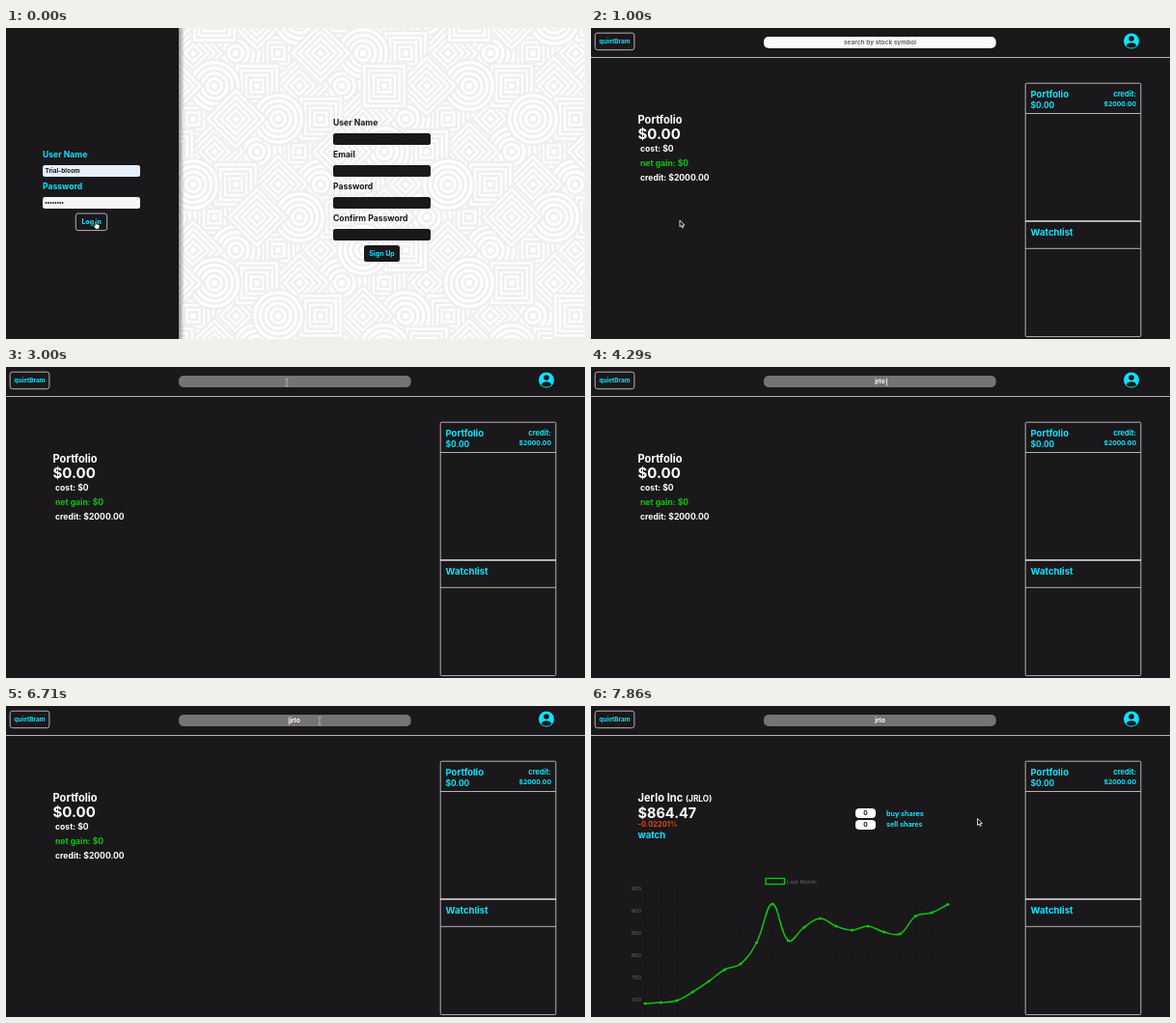
Write an HTML page that moves like this. It is 600 px wide and 322 px high and loops after 8 s.

```html
<!DOCTYPE html>
<html lang="en">
<head>
<meta charset="utf-8">
<title>Stock portfolio demo</title>
<style>
  html, body { margin: 0; width: 100%; height: 100%; overflow: hidden; background: #1a181b; }
  svg { display: block; width: 100%; height: 100%; }
  text { font-family: Inter, sans-serif; font-weight: 650; fill: #fff; }
  .cyan { fill: #0be4fc; }
  .dark { fill: #1a181b; }
  .mid { text-anchor: middle; }
  .end { text-anchor: end; }
  .line { fill: none; stroke: #b4b3b5; }
  .axis { font: 6.2px "Liberation Sans", Arial, sans-serif; fill: #666; }
</style>
</head>
<body>
<svg viewBox="0 0 600 322">
  <defs>
    <g id="tile0"></g><g id="tile1"></g><g id="tile2"></g>
    <linearGradient id="shade">
      <stop stop-color="#000" stop-opacity=".38"/>
      <stop offset="1" stop-color="#000" stop-opacity="0"/>
    </linearGradient>
  </defs>

  <g id="login">
    <rect width="600" height="322" fill="#fff"/>
    <g id="backdrop"></g>
    <rect x="179" width="6" height="322" fill="url(#shade)"/>
    <rect class="dark" width="179" height="322"/>
    <g font-size="8.6">
      <text class="cyan" x="38" y="134">User Name</text>
      <text class="cyan" x="38" y="167">Password</text>
    </g>
    <rect x="38" y="142" width="101" height="12" rx="2.5" fill="#e8f0fe"/>
    <rect x="38" y="175" width="101" height="12" rx="2.5" fill="#f4f8f3"/>
    <text class="dark" x="40.5" y="150.4" font-size="6.4">Trial-bloom</text>
    <g id="dots" class="dark"></g>
    <rect class="line" x="72.3" y="192" width="32.4" height="17.6" rx="2.5"/>
    <rect id="ring" x="72" y="191.5" width="33" height="18.5" rx="2.5" fill="none" stroke="#58b4e4" stroke-width="1.7"/>
    <text class="cyan mid" x="88.7" y="203.3" font-size="7">Log in</text>
    <g id="signup"></g>
    <rect class="dark" x="371" y="225" width="37" height="17" rx="2.5"/>
    <text class="cyan mid" x="389.5" y="236.2" font-size="7">Sign Up</text>
  </g>

  <g id="app">
    <rect class="dark" width="600" height="322"/>
    <rect class="line" x="4.2" y="5.2" width="40.7" height="17.5" rx="2.5"/>
    <text class="cyan mid" x="24.5" y="16.3" font-size="6.4">quietBram</text>
    <rect id="bar" x="179" y="9.1" width="240.7" height="11.9" rx="5"/>
    <text id="hint" class="mid" x="299.5" y="17.4" font-size="6.5" style="fill:#68666a">search by stock symbol</text>
    <text id="query" class="mid" x="299.5" y="17.4" font-size="6.8"></text>
    <path id="spelling" d="M293.5 19.3h12.5" stroke="#e0453c" stroke-width=".7" stroke-dasharray="1 .7"/>
    <rect id="caret" y="11.5" width=".8" height="8" fill="#fff"/>
    <circle cx="560" cy="13.5" r="8" fill="#0be4fc"/>
    <circle class="dark" cx="560" cy="11" r="2.8"/>
    <path class="dark" d="M554.6 18.4q1.4-3.2 5.4-3.2t5.4 3.2q-2 2.2-5.4 2.2t-5.4-2.2z"/>
    <path class="line" d="M0 30.5H600"/>

    <g class="line">
      <rect x="450.2" y="57.2" width="119.6" height="262.4" rx="1"/>
      <path d="M450 88.5h120M450 228.3h120"/>
      <path d="M450 200h120" stroke="#e4e4e4" stroke-width="1.4"/>
    </g>
    <text class="cyan" x="455.5" y="72" font-size="9.5">Portfolio</text>
    <text class="cyan" x="455.5" y="83.3" font-size="8.4">$0.00</text>
    <text class="cyan end" x="565" y="71.2" font-size="7.5">credit:</text>
    <text class="cyan end" x="565" y="81.2" font-size="6.8">$2000.00</text>
    <text class="cyan" x="455.5" y="215" font-size="9.6">Watchlist</text>

    <g id="summary">
      <text x="48.5" y="99" font-size="11.1">Portfolio</text>
      <text x="48.5" y="115" font-size="15">$0.00</text>
      <g font-size="8.6">
        <text x="51" y="127.8">cost: $0</text>
        <text x="51" y="143" style="fill:#0cc40c">net gain: $0</text>
        <text x="51" y="158.2">credit: $2000.00</text>
      </g>
    </g>

    <g id="stock">
      <text x="48.5" y="99" font-size="11.1">Jerlo Inc <tspan font-size="8.3">(JRLO)</tspan></text>
      <text x="48.5" y="115.8" font-size="14.5">$864.47</text>
      <text x="48.5" y="125" font-size="7.5" style="fill:#e5440f">-0.02201%</text>
      <text class="cyan" x="48.5" y="136.5" font-size="9.6">watch</text>
      <rect x="274" y="106" width="21" height="10" rx="4" fill="#fff"/>
      <rect x="274" y="118" width="21" height="10" rx="4" fill="#fff"/>
      <g font-size="6.6">
        <text class="dark mid" x="284.5" y="113.4">0</text>
        <text class="dark mid" x="284.5" y="125.4">0</text>
      </g>
      <text class="cyan" x="306" y="113.5" font-size="7.2">buy shares</text>
      <text class="cyan" x="306" y="125.4" font-size="7.2">sell shares</text>
      <rect x="181" y="178.5" width="19.5" height="6" fill="none" stroke="#0cc40c" stroke-width="1.4"/>
      <text class="axis" x="203" y="183.8">Last Month</text>
      <g id="axis"></g>
      <path id="curve" fill="none" stroke="#0cc40c" stroke-width="1.5"/>
      <path id="marks" stroke="#0cc40c" stroke-width="3.2" stroke-linecap="round"/>
    </g>
  </g>

  <g id="pointer" stroke-linejoin="round">
    <path id="hand" d="M-.8 4.2L-2.6 1.6Q-2.6.6-1.6 1L-.8 1.8V-2.6Q0-3.6.8-2.6V0L3.2.6Q4.2 1 4 2.2L3.2 5.2H0z" fill="#fff" stroke="#111" stroke-width=".7"/>
    <path id="arrow" d="M0 0V7L1.6 5.5 2.7 8 3.8 7.5 2.8 5.1H5z" fill="#111" stroke="#fff" stroke-width=".8"/>
    <path id="beam" d="M-1.8-4Q0-4 0-3V3Q0 4-1.8 4M1.8-4Q0-4 0-3M0 3Q0 4 1.8 4" fill="none" stroke="#c8c8c8" stroke-width=".7"/>
  </g>
</svg>

<script>
const LOOP = 8000, FPS = 7;
const $ = id => document.getElementById(id);
const show = (id, on) => $(id).style.display = on ? '' : 'none';
const clamp = v => Math.min(1, Math.max(0, v));
const ramp = (t, from, to) => clamp((t - from) / (to - from));
const mix = (a, b, k) => a + (b - a) * k;
const range = (n, make) => Array.from({ length: n }, (_, i) => make(i)).join('');

// Wallpaper: concentric circles, squares and diamonds, stacked in scattered order.
const shapes = [
  r => `<circle r="${r}"/>`,
  r => `<rect x="${-r * .85}" y="${-r * .85}" width="${r * 1.7}" height="${r * 1.7}"/>`,
  r => `<path d="M0 ${-r * 1.2}L${r * 1.2} 0 0 ${r * 1.2} ${-r * 1.2} 0z"/>`
];
const COLS = 11, ROWS = 11;
shapes.forEach((shape, i) => $('tile' + i).innerHTML = range(5, n => shape(27 - n * 5.6)));
$('backdrop').innerHTML = `<g fill="#fff" stroke="#f0eef1" stroke-width="2.6">` +
  range(COLS * ROWS, i => {
    const cell = i * 47 % (COLS * ROWS), col = cell % COLS, row = Math.floor(cell / COLS);
    return `<use href="#tile${(col + row * 2 + (row >> 1)) % 3}" x="${172 + col * 44 + row % 2 * 22}" y="${row * 34 - 8}"/>`;
  }) + '</g>';

$('dots').innerHTML = range(8, i => `<circle cx="${41.5 + i * 2.45}" cy="181" r=".9"/>`);
$('signup').innerHTML = ['User Name', 'Email', 'Password', 'Confirm Password'].map((label, i) =>
  `<text class="dark" font-size="8.6" x="339" y="${101 + i * 33}">${label}</text>
   <rect class="dark" x="339" y="${109 + i * 33}" width="101" height="12" rx="2.5"/>`).join('');

// Price chart
const heights = [308, 307, 305, 296, 285, 273, 267, 245, 205, 243, 229, 220, 228, 232, 228, 234, 236, 217.5, 214, 205.5];
const BASE = 327, STEP = 16.5, LEFT = 56;
$('axis').innerHTML =
  range(20, i => `<path d="M${LEFT + i * STEP} 189V322" stroke="#000" stroke-opacity=".12"/>`) +
  range(6, i => `<path d="M52 ${189 + i * 23}H370" stroke="#000" stroke-opacity=".12"/>
    <text class="axis end" x="52" y="${191.2 + i * 23}">${950 - i * 50}</text>`);

function drawChart(grow) {
  const pts = heights.map((h, i) => [LEFT + i * STEP, mix(BASE, h, grow)]);
  const dist = (a, b) => Math.hypot(a[0] - b[0], a[1] - b[1]);
  const controls = pts.map((p, i) => {
    const prev = pts[i - 1] || p, next = pts[i + 1] || p;
    const before = dist(prev, p), after = dist(p, next);
    const offset = length => {
      const k = .4 * length / (before + after);
      return [k * (next[0] - prev[0]), k * (next[1] - prev[1])];
    };
    const a = offset(before), b = offset(after);
    return { enter: [p[0] - a[0], p[1] - a[1]], leave: [p[0] + b[0], p[1] + b[1]] };
  });
  $('curve').setAttribute('d', pts.map((p, i) =>
    i ? `C${controls[i - 1].leave} ${controls[i].enter} ${p}` : `M${p}`).join(''));
  $('marks').setAttribute('d', pts.map(p => `M${p}h.01`).join(''));
}

// Pointer path: time, x, y
const path = [
  [0, 93, 203], [990, 93, 203], [1000, 92, 199], [1710, 284, 51], [2000, 284, 51], [2570, 291, 16],
  [4720, 291, 16], [5570, 297, 15.5], [6430, 297, 15.5], [6710, 325, 15.5],
  [7570, 325, 15.5], [7850, 400.5, 116.5], [LOOP, 400.5, 116.5]
];
function pointerAt(t) {
  const i = path.findIndex(key => key[0] > t);
  const [t0, x0, y0] = path[i - 1], [t1, x1, y1] = path[i];
  const k = ramp(t, t0, t1), ease = k * k * (3 - 2 * k);
  return [mix(x0, x1, ease), mix(y0, y1, ease)];
}

const keyTimes = [3400, 3550, 4130, 4270];
const between = (t, a, b) => t >= a && t < b;

function render(t) {
  const loggedIn = t >= 1000, loaded = t >= 6990;
  show('login', !loggedIn);
  show('app', loggedIn);
  $('ring').style.opacity = ramp(t, 0, 430);

  const focus = ramp(t, 2000, 2430);
  const grey = [250, 250, 252].map((c, i) => Math.round(mix(c, [117, 115, 118][i], focus)));
  $('bar').setAttribute('fill', `rgb(${grey})`);
  $('hint').style.opacity = 1 - focus;
  const typed = keyTimes.filter(k => t >= k).length;
  $('query').textContent = 'jrlo'.slice(0, typed);
  show('spelling', between(t, 4850, 6990));
  show('caret', between(t, 2560, 2990) || between(t, 3130, 4850) || between(t, 6130, 6990));
  $('caret').setAttribute('x', t > 5000 ? 292.8 : 299.2 + typed * 1.7);

  show('summary', !loaded);
  show('stock', loaded);
  drawChart(1 - (1 - ramp(t, 6900, 7900)) ** 4);

  const [x, y] = pointerAt(t);
  const overBar = loggedIn && y < 21;
  $('pointer').setAttribute('transform', `translate(${x} ${y})`);
  show('pointer', !between(t, 3400, 4850));
  show('hand', !loggedIn);
  show('arrow', loggedIn && !overBar);
  show('beam', overBar);
}

function tick() {
  const t = performance.now() % LOOP;
  render(Math.floor((t + 6) * FPS / 1000) % (LOOP * FPS / 1000) * 1000 / FPS);
  requestAnimationFrame(tick);
}
tick();
</script>
</body>
</html>
```
